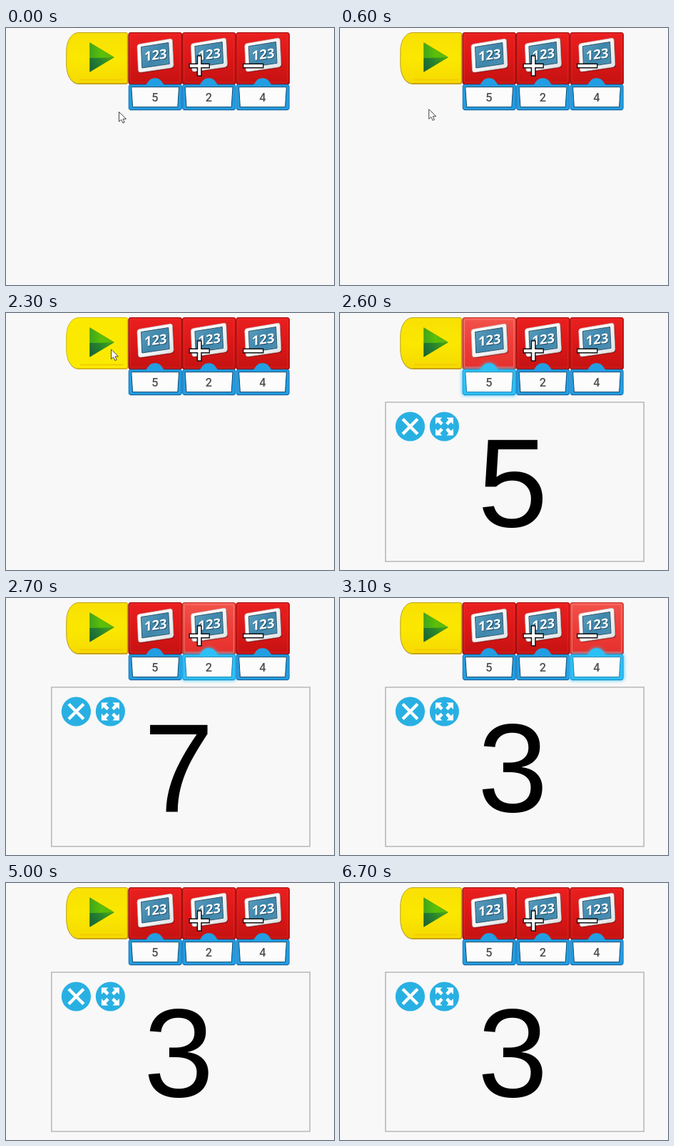
Animation, 460 px wide and 360 px high, one loop 6800 ms. Source, as an HTML page with a canvas:

```html
<!DOCTYPE html>
<html lang="en">
<head>
<meta charset="utf-8">
<title>Number blocks</title>
<style>
html, body { margin: 0; width: 100%; height: 100%; overflow: hidden; background: #f8f8f8; }
canvas { display: block; width: 460px; height: 360px; }
</style>
</head>
<body>
<canvas id="stage"></canvas>
<script>
const W = 460, H = 360, LOOP = 6800, STEP = 100, PITCH = 75.4;
const canvas = document.getElementById('stage');
const dpr = window.devicePixelRatio || 1;
canvas.width = W * dpr;
canvas.height = H * dpr;
const c = canvas.getContext('2d');

function gradient(x0, y0, x1, y1, ...colors) {
  const g = c.createLinearGradient(x0, y0, x1, y1);
  colors.forEach((col, i) => g.addColorStop(i / (colors.length - 1), col));
  return g;
}

function paint(path, fill, stroke, width = 1) {
  if (fill) { c.fillStyle = fill; c.fill(path); }
  if (stroke) { c.strokeStyle = stroke; c.lineWidth = width; c.stroke(path); }
}

function box(x, y, w, h, r, fill, stroke, width) {
  const p = new Path2D();
  p.roundRect(x, y, w, h, r);
  paint(p, fill, stroke, width);
}

function label(text, x, y, font, color) {
  c.font = font;
  c.fillStyle = color;
  c.textAlign = 'center';
  c.textBaseline = 'alphabetic';
  c.fillText(text, x, y);
}

const startShape = new Path2D(
  'M102 6.5 H168 Q171 6.5 171 9.5 V75 Q171 78 168 78 H102 C92 78 84.8 66 84.8 52 V32 C84.8 18 92 6.5 102 6.5 Z');
const startRim = new Path2D('M102 77.8 H168 Q170.5 77.8 170.5 75 V10');
const playShape = new Path2D('M117.5 20.5 L151.5 41 L117.5 61.5 Z');
const playShade = new Path2D('M117.5 42 Q134 42 151.5 41 L117.5 61.5 Z');

function startBlock(pressed) {
  c.save();
  c.translate(0, 0.9);
  paint(startShape, '#b5a878');
  c.restore();
  paint(startShape, pressed ? '#fbea00' : gradient(0, 6, 0, 79, '#f8e004', '#fbe800', '#f5d900'),
    pressed ? '#d0b400' : '#b89a12', 0.9);
  paint(startRim, null, pressed ? '#e0b800' : '#c99a08', 1.3);
  c.globalAlpha = pressed ? 0.6 : 0.45;
  paint(new Path2D('M104 72.5 H165'), null, '#efb800', 2);
  c.globalAlpha = 1;
  paint(playShape, gradient(117, 0, 151, 0, '#3da51c', '#5cc008', '#5cb80c'));
  paint(playShade, gradient(117, 56, 144, 41, '#1b6338', '#25802f', '#3f9f1c'));
  paint(playShape, null, 'rgba(40,110,10,.4)', 0.8);
}

const frame = new Path2D(
  'M187.5 22.5 L230 15.3 Q233.2 14.8 233.4 18.5 L235 51.5 Q235.1 55 231.5 55.8 L189 62 Q185.8 62.4 185.5 58.8 L184 26.5 Q183.9 23 187.5 22.5 Z');
const screen = new Path2D('M189.5 26.6 L227.8 20.5 L229.2 50.3 L190.8 56 Z');

function numberIcon() {
  c.save();
  c.translate(1, 1.2);
  paint(frame, 'rgba(90,0,0,.55)');
  c.restore();
  paint(frame, gradient(185, 20, 232, 60, '#ffffff', '#f6f6f6', '#dfe3e5'), '#c4bcbc', 0.7);
  paint(screen, gradient(190, 24, 229, 54, '#5a9dbd', '#3f86ab', '#4b91b4'), '#2d5870', 1);
  c.save();
  c.transform(1, -0.13, 0, 1, 209.8, 44.4);
  const font = '700 18.5px "Open Sans", "Noto Sans", sans-serif';
  label('123', 0.9, 1, font, '#1d4a63');
  label('123', 0, 0, font, '#fff');
  c.restore();
}

// Plus or minus sign over the lower left corner of the icon
function sign(plus) {
  const x = plus ? 271.2 : 346.7;
  const cross = r => new Path2D(
    `M${x - r} 53 H${x + r}` + (plus ? ` M${x} ${53 - r} V${53 + r}` : ''));
  paint(cross(14.7), null, '#111', 7);
  paint(cross(13.3), null, '#fff', 4);
}

function numberBlock(i, value, lit) {
  c.save();
  c.translate(i * PITCH, 0);
  box(172, 8, 75, 71.3, 3, '#8d1513');
  box(172, 6.5, 74.5, 72, 3,
    lit ? gradient(0, 6, 0, 79, '#f2534b', '#ee3d38', '#e5302c')
        : gradient(0, 6, 0, 79, '#ea2020', '#dc1717', '#c41212'),
    lit ? '#c23a33' : '#a01010', 1.2);
  box(174.5, 9, 69.5, 67, 2, null, lit ? 'rgba(255,150,140,.6)' : 'rgba(240,60,50,.3)', 1.2);

  const blue = lit ? '#2cc0f6' : '#229ee3';
  const rim = lit ? '#22a4e0' : '#1a7cc0';
  if (lit) { c.shadowColor = '#35c8ff'; c.shadowBlur = 5; }
  box(172.3, 79.3, 74, 35.2, 3, blue, rim, 1.2);
  const knob = new Path2D('M194 80.5 C199.5 79.5 198.5 70.2 209 70.2 C219.5 70.2 218.5 79.5 224 80.5 Z');
  paint(knob, blue);
  c.shadowBlur = 0;
  paint(new Path2D('M174 114.6 H244.5'), null, lit ? '#1b8fc8' : '#15609b', 1.2);
  paint(new Path2D('M175.8 82.7 H242.6 L240.8 110.7 H177.6 Z'), '#fcfcfc', lit ? '#2083ae' : '#15486b', 1);
  label(value, 209, 102.5, '500 16.3px Roboto, "Open Sans", sans-serif', '#505050');
  if (i > 0) c.translate(0, -1);
  numberIcon();
  c.restore();
}

function roundButton(x) {
  c.fillStyle = '#29b0e3';
  c.beginPath();
  c.arc(x, 159, 20.6, 0, Math.PI * 2);
  c.fill();
}

function panel(digit) {
  box(63.8, 125, 362.4, 223, 0, '#f8f8f8', '#b9b9b9', 1.6);
  roundButton(98.4);
  paint(new Path2D('M88 148.5 L108.8 169.5 M108.8 148.5 L88 169.5'), null, '#fff', 4.4);

  roundButton(146.4);
  const arrow = new Path2D('M-12.5 -12.5 H-3 L-6 -9.4 L-1.8 -5 L-5 -1.8 L-9.4 -6 L-12.5 -3 Z');
  for (let k = 0; k < 4; k++) {
    c.save();
    c.translate(146.4, 159);
    c.rotate(k * Math.PI / 2);
    paint(arrow, '#fff');
    c.restore();
  }
  label(digit, 242.3, 299, '177px "Liberation Sans", Arial, sans-serif', '#000');
}

const arrowShape = new Path2D('M0 0 V13.6 L3.2 10.8 L5.4 15.6 L7.7 14.6 L5.6 9.9 H10 Z');
const easeIn = u => u * u;
const easeOut = u => 1 - (1 - u) * (1 - u);
const easeBoth = u => u * u * (3 - 2 * u);
const moves = [
  { from: 0, to: 700, a: [158, 117], b: [112, 112], ease: easeIn },
  { from: 700, to: 1300, a: [112, 112], b: [-2, 182], ease: easeBoth },
  { from: 1300, to: 1400, a: [-2, 182], b: [7, 157], ease: easeIn },
  { from: 1400, to: 2000, a: [7, 157], b: [147, 50.5], ease: easeOut }
];

function pointer(t) {
  const m = moves.find(m => t < m.to) || moves[moves.length - 1];
  const u = m.ease(Math.min(1, (t - m.from) / (m.to - m.from)));
  c.save();
  c.translate(m.a[0] + (m.b[0] - m.a[0]) * u + 0.5, m.a[1] + (m.b[1] - m.a[1]) * u + 0.5);
  paint(arrowShape, '#fff', '#44444c', 1);
  c.restore();
}

const values = ['5', '2', '4'];
const totals = ['5', '7', '3'];
const PRESS = 2300, RUN = 2600, STOP = 3200;

function draw(t) {
  c.setTransform(dpr, 0, 0, dpr, 0, 0);
  c.fillStyle = '#f8f8f8';
  c.fillRect(0, 0, W, H);
  const running = t >= RUN;
  const active = t < 2700 ? 0 : t < 2900 ? 1 : 2;
  startBlock(t >= PRESS && !running);
  values.forEach((v, i) => numberBlock(i, v, running && t < STOP && i === active));
  sign(true);
  sign(false);
  if (running) panel(totals[active]);
  else pointer(t);
}

const began = performance.now();
function tick() {
  const t = (performance.now() - began) % LOOP;
  draw(Math.floor(t / STEP) * STEP);
  requestAnimationFrame(tick);
}
tick();
</script>
</body>
</html>
```
